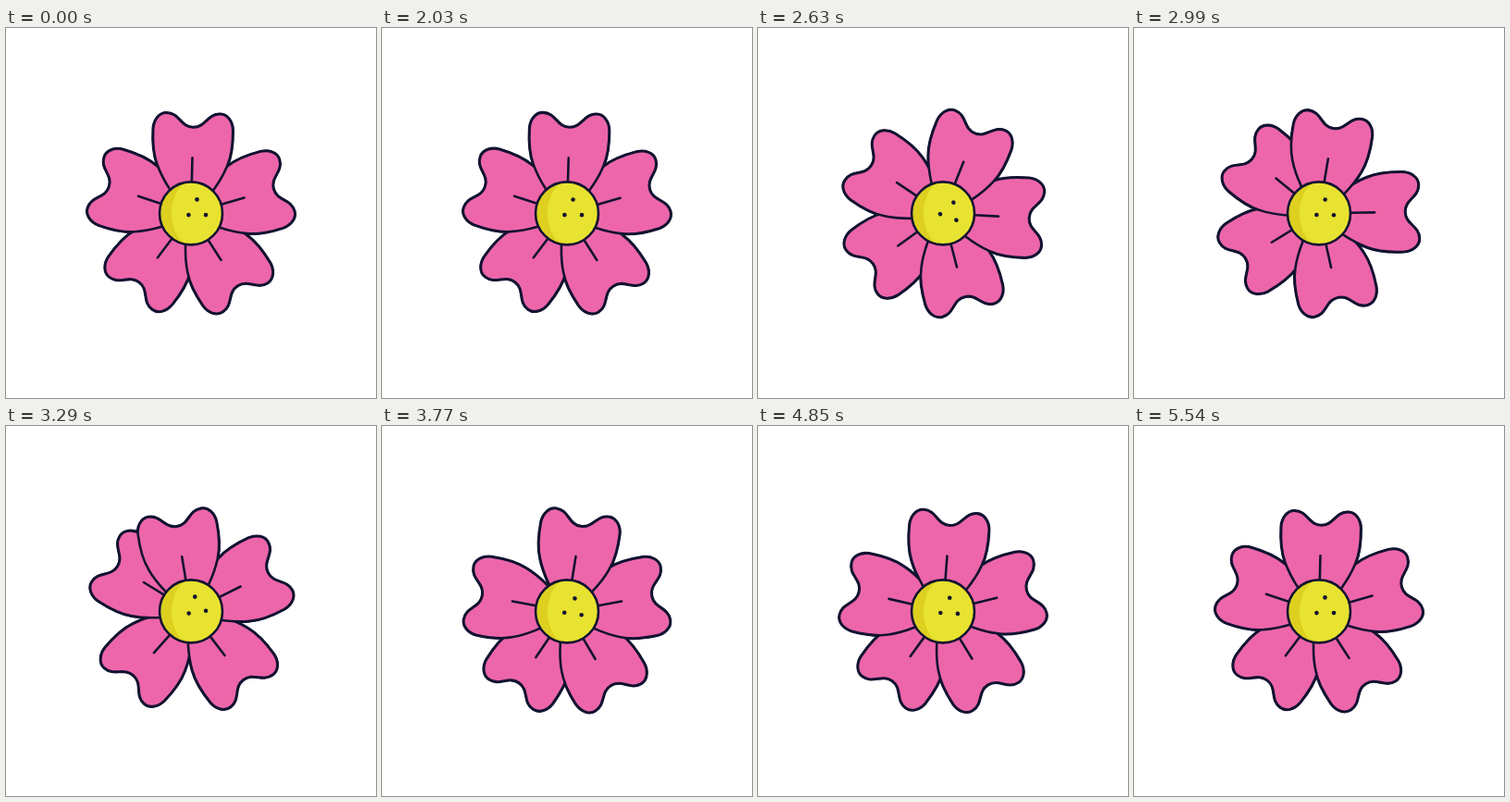
An HTML page for the animation above (5.57 s loop, 400 by 400 pixels).

```html
<!DOCTYPE html>
<html lang="en">
<head>
<meta charset="utf-8">
<title>Flower</title>
<style>
  html, body { margin: 0; width: 100%; height: 100%; overflow: hidden; background: #fff; }
  svg { display: block; width: 100vw; height: 100vh; }
  .line { stroke: #121331; stroke-width: 2.6; stroke-linecap: round; stroke-linejoin: round; }
  #rim { stroke: #121331; stroke-width: 3.5; }
</style>
</head>
<body>
<svg viewBox="0 0 400 400">
  <defs>
    <path id="shape" d="M0 0C-8 -12 -16 -16 -23.5 -25.5C-30 -35 -35 -44.5 -37.8 -52C-41.8 -62 -43.4 -78 -43 -91C-42.5 -100 -37 -108 -29 -108C-15 -108 -14 -93 0 -93C14 -93 15 -108 29 -108C37 -108 42.5 -100 43 -91C43.4 -78 41.8 -62 37.8 -52C35 -44.5 30 -35 23.5 -25.5C16 -16 8 -12 0 0Z"/>
    <g id="petal" class="line">
      <use href="#shape" fill="#ee66aa"/>
      <path fill="none" d="M0 -34V-60"/>
    </g>
  </defs>
  <g transform="translate(200 200.4)">
    <g id="rim"></g>
    <g id="petals"></g>
    <circle r="34" fill="#e8e230"/>
    <path fill="#ddd020" d="M0 -34A34 34 0 0 0 0 34A21 34 0 0 1 0 -34Z"/>
    <circle r="34" fill="none" class="line"/>
    <g id="dots" fill="#121331">
      <circle cx="6.5" cy="-15" r="2.3"/>
      <circle cx="-2.6" cy="1.7" r="2.3"/>
      <circle cx="16" cy="1.7" r="2.3"/>
    </g>
  </g>
</svg>
<script>
  const LOOP = 5570;
  const START = 2010;
  // Successive swing angles, shared by every part
  const swings = [21.5, -11, 8, -5.5, 3, 0];

  // Rest angle and the time each swing is reached; later petals trail behind
  const petals = [
    { rest: 1.4,   times: [2780, 3255, 3815, 4365, 4890, 5400] },
    { rest: 73.7,  times: [2852, 3335, 3890, 4432, 4960, 5440] },
    { rest: 147.2, times: [2924, 3443, 3970, 4475, 5010, 5475] },
    { rest: 217,   times: [2996, 3578, 4005, 4600, 5080, 5520] },
    { rest: 288,   times: [3110, 3660, 4050, 4790, 5170, 5550] }
  ];
  const heartTimes = [2760, 3150, 3720, 4250, 4800, 5370];

  const ease = p => Math.sin(p * Math.PI / 2) ** 2;

  function swing(times, t) {
    if (t <= START) return 0;
    const i = times.findIndex(end => t < end);
    if (i < 0) return 0;
    const t0 = i ? times[i - 1] : START;
    const a = i ? swings[i - 1] : 0;
    const p = (t - t0) / (times[i] - t0);
    return a + (swings[i] - a) * ease(i ? p : p ** 0.75);
  }

  const byId = id => document.getElementById(id);
  const dots = byId('dots');

  function addUse(parent, href) {
    const use = document.createElementNS('http://www.w3.org/2000/svg', 'use');
    use.setAttribute('href', href);
    byId(parent).appendChild(use);
    return use;
  }

  // Back to front; the rim thickens only the outer silhouette
  for (const i of [3, 2, 1, 4, 0]) {
    petals[i].nodes = [addUse('rim', '#shape'), addUse('petals', '#petal')];
  }

  const turn = (node, deg) => node.setAttribute('transform', `rotate(${deg.toFixed(3)})`);

  function draw(t) {
    for (const p of petals) {
      const deg = p.rest + swing(p.times, t);
      p.nodes.forEach(node => turn(node, deg));
    }
    turn(dots, swing(heartTimes, t));
  }

  const begin = performance.now();
  function tick() {
    draw((performance.now() - begin) % LOOP);
    requestAnimationFrame(tick);
  }
  draw(0);
  requestAnimationFrame(tick);
</script>
</body>
</html>
```
